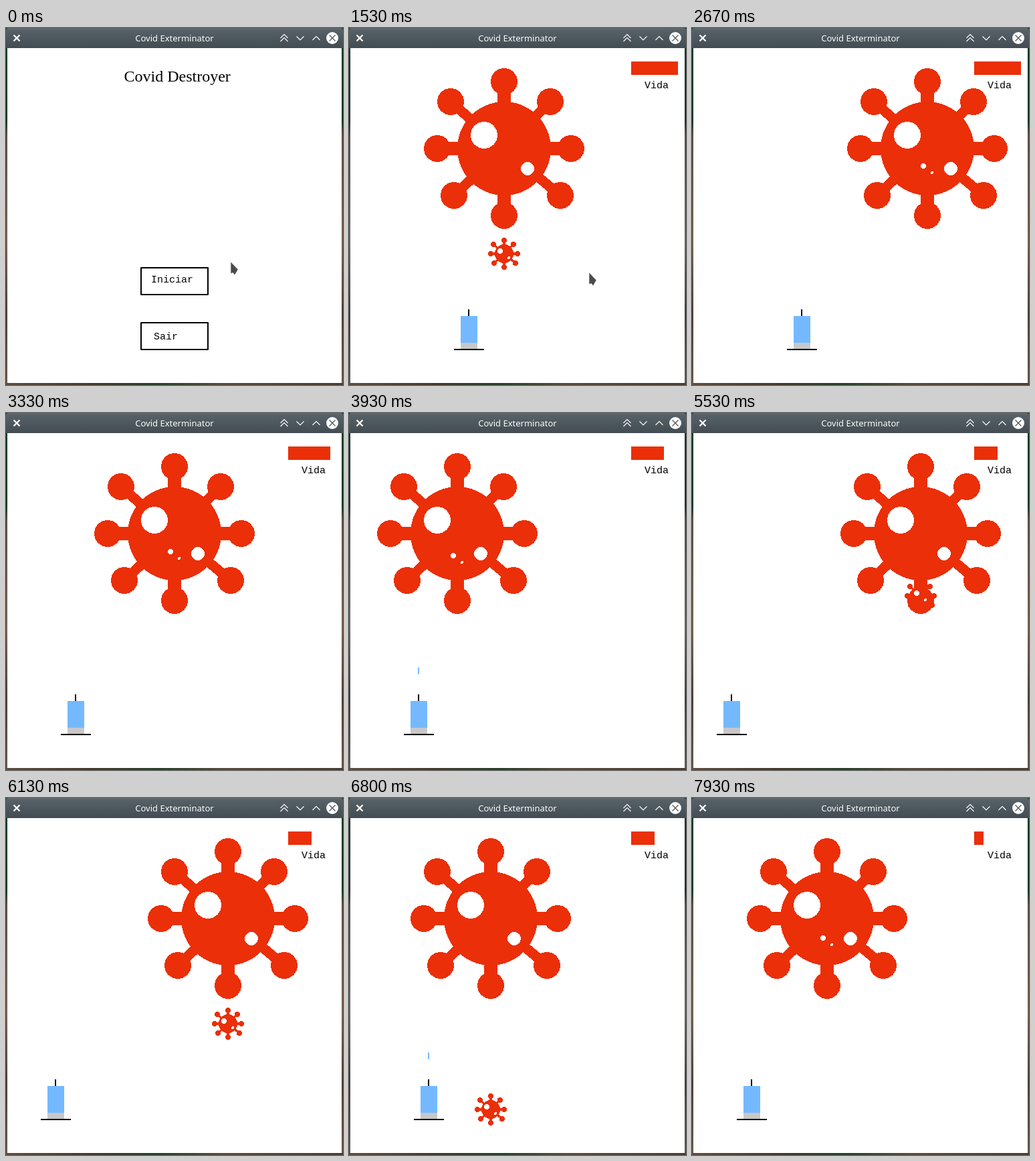
An HTML page for the animation above (8000 ms loop, 504 by 533 pixels).

```html
<!DOCTYPE html>
<html lang="pt">
<head>
<meta charset="utf-8">
<title>Covid Exterminator</title>
<style>
  html, body { margin: 0; width: 100%; height: 100%; overflow: hidden; background: #2b2620; }
  svg { display: block; width: 504px; height: 533px; }
  .crisp { shape-rendering: crispEdges; }
  .mono { font: 15px "Liberation Mono", monospace; }
  .serif { font: 24px "Liberation Serif", serif; }
  .bar { font: 13px "Noto Sans", sans-serif; fill: #fcfcfc; text-anchor: middle; }
</style>
</head>
<body>
<svg viewBox="0 0 504 533">
  <defs>
    <linearGradient id="title" x2="0" y2="1">
      <stop offset="0" stop-color="#616a70"/>
      <stop offset=".12" stop-color="#566067"/>
      <stop offset="1" stop-color="#434c53"/>
    </linearGradient>
    <linearGradient id="side" x2="0" y2="1">
      <stop offset="0" stop-color="#0b3a22"/>
      <stop offset=".26" stop-color="#12351f"/>
      <stop offset=".3" stop-color="#5d4b3d"/>
      <stop offset=".6" stop-color="#77604f"/>
      <stop offset=".8" stop-color="#4a3b30"/>
      <stop offset="1" stop-color="#6b5646"/>
    </linearGradient>
    <linearGradient id="floor">
      <stop offset="0" stop-color="#5f4c3e"/>
      <stop offset=".25" stop-color="#45382b"/>
      <stop offset=".45" stop-color="#24402a"/>
      <stop offset=".65" stop-color="#5b4a3b"/>
      <stop offset="1" stop-color="#4a3c31"/>
    </linearGradient>
    <g id="virus" class="crisp">
      <g stroke="#eb2f08" stroke-width="20">
        <path d="M0-100V100M-100 0H100"/>
        <path stroke-width="15" d="M-80-70L0 0L69-70M-75 70L0 0L84 70" fill="none"/>
      </g>
      <g fill="#eb2f08">
        <circle r="70"/>
        <circle r="20" cy="-100"/><circle r="20" cy="100"/>
        <circle r="20" cx="-100"/><circle r="20" cx="100"/>
        <circle r="20" cx="-80" cy="-70"/><circle r="20" cx="69" cy="-70"/>
        <circle r="20" cx="-75" cy="70"/><circle r="20" cx="84" cy="70"/>
      </g>
      <g fill="#fff">
        <circle r="20" cx="-30" cy="-20"/><circle r="10" cx="35" cy="30"/>
      </g>
    </g>
  </defs>

  <rect width="504" height="533" fill="url(#side)"/>
  <rect y="530" width="504" height="3" fill="url(#floor)"/>
  <rect x="2" y="30" width="500" height="500" fill="#fff"/>
  <path d="M0 30V4Q0 0 4 0H500Q504 0 504 4V30Z" fill="url(#title)"/>
  <text class="bar" x="252" y="20">Covid Exterminator</text>
  <g fill="none" stroke="#fcfcfc" stroke-width="1.2">
    <path d="M11.5 10.5l9 9m0-9l-9 9" stroke-width="2.4"/>
    <path d="M410.500 15l5.500-5.500l5.500 5.500M410.500 20l5.500-5.500l5.500 5.500"/>
    <path d="M434.500 12.500l5.500 5.500l5.500-5.500M458.500 18l5.500-5.500l5.500 5.500"/>
    <circle cx="488" cy="15" r="9" fill="#fcfcfc" stroke="none"/>
    <path d="M483.500 10.500l9 9m0-9l-9 9" stroke="#4a5359"/>
  </g>

  <g id="menu">
    <text class="serif" x="176.500" y="80">Covid Destroyer</text>
    <g fill="none" stroke="#000" stroke-width="2" stroke-linejoin="round">
      <rect x="202" y="358" width="100" height="40"/>
      <rect x="202" y="440" width="100" height="40"/>
    </g>
    <text class="mono" x="217" y="380">Iniciar</text>
    <text class="mono" x="221" y="465">Sair</text>
  </g>

  <g id="game">
    <use id="boss" href="#virus"/>
    <use id="drop" href="#virus"/>
    <g class="crisp">
      <rect id="life" x="422" y="50" height="20" fill="#eb2f08"/>
      <rect id="shot" width="2" height="10" fill="#74b9ff"/>
      <g id="syringe">
        <rect x="21" y="420" width="2" height="10"/>
        <rect x="10" y="430" width="25" height="40" fill="#74b9ff"/>
        <rect x="10" y="470" width="25" height="10" fill="#c8c8c8"/>
        <rect y="479" width="45" height="2"/>
      </g>
    </g>
    <text class="mono" x="442" y="90">Vida</text>
  </g>

  <path id="mouse" d="M0 0V17.500L3.500 16.500L6 20L11 11.500Z" fill="#4a4a4a" stroke="#e4e4e4" stroke-width=".7"/>
</svg>
<script>
const LOOP = 8000, FPS = 15, START = 19;
const $ = id => document.getElementById(id);
const put = (el, x, y, s = 1) => el.setAttribute('transform', `translate(${x} ${y}) scale(${s})`);
const show = (el, on) => el.setAttribute('visibility', on ? 'visible' : 'hidden');

// [tick, distance] of the virus along its path
const TRAVEL = [[19, 0], [23, 50], [40, 230], [59, 420], [83, 680], [102, 890],
                [109, 970], [110, 980], [111, 980], [119, 1060]];
// Ticks at which the syringe moves one step of 15 px
const LEFT = [36, 45, 46, 47, 48, 69, 70, 71, 72, 117, 118];
const RIGHT = [82, 92, 93, 94, 95];
const SHOTS = [47, 51, 55, 59, 63, 102, 106, 112];
const FLIGHT = 3;
const MOUSE_X = [[2, 336], [10, 285], [18, 285], [23, 359]];
const MOUSE_Y = [[2, 349], [10, 369], [18, 369], [23, 365]];

function at(table, n) {
  if (n <= table[0][0]) return table[0][1];
  for (let i = 1; i < table.length; i++) {
    const [a, p] = table[i - 1], [b, q] = table[i];
    if (n <= b) return p + (q - p) * (n - a) / (b - a);
  }
  return table[table.length - 1][1];
}

const passed = (list, n) => list.filter(k => k <= n).length;

// Bounce between the left and right walls
function bossX(n) {
  const d = Math.floor(at(TRAVEL, n) / 10 + 1e-6) * 10 + 60;
  const m = d % 520;
  return 122 + (m < 260 ? m : 520 - m);
}

// The drop doubles its distance every half second
function dropY(t) {
  const k = (Math.floor((t - 1350) / 500) + 7) % 9;
  return 209 + 2 ** k;
}

function draw(t) {
  const n = Math.floor((t + 5) * FPS / 1000);
  const playing = n >= START;
  show($('menu'), !playing);
  show($('mouse'), n < 27);
  put($('mouse'), Math.round(at(MOUSE_X, n)), Math.round(at(MOUSE_Y, n)));

  const x = bossX(n);
  put($('boss'), x, 180);
  put($('drop'), x, dropY(Math.max(t, 1270)), .2);

  const left = 157 + 15 * (passed(RIGHT, n) - passed(LEFT, n));
  put($('syringe'), left, 0);
  $('life').setAttribute('width', 70 - 7 * passed(SHOTS, n - FLIGHT));

  const fired = SHOTS.find(k => n >= k && n < k + FLIGHT);
  show($('game'), playing);
  $('shot').setAttribute('visibility', fired ? 'visible' : 'hidden');
  if (fired) put($('shot'), left + 21, 380 - 40 * (n - fired));
}

const begin = performance.now();
function tick() {
  draw((performance.now() - begin) % LOOP);
  requestAnimationFrame(tick);
}
tick();
</script>
</body>
</html>
```
